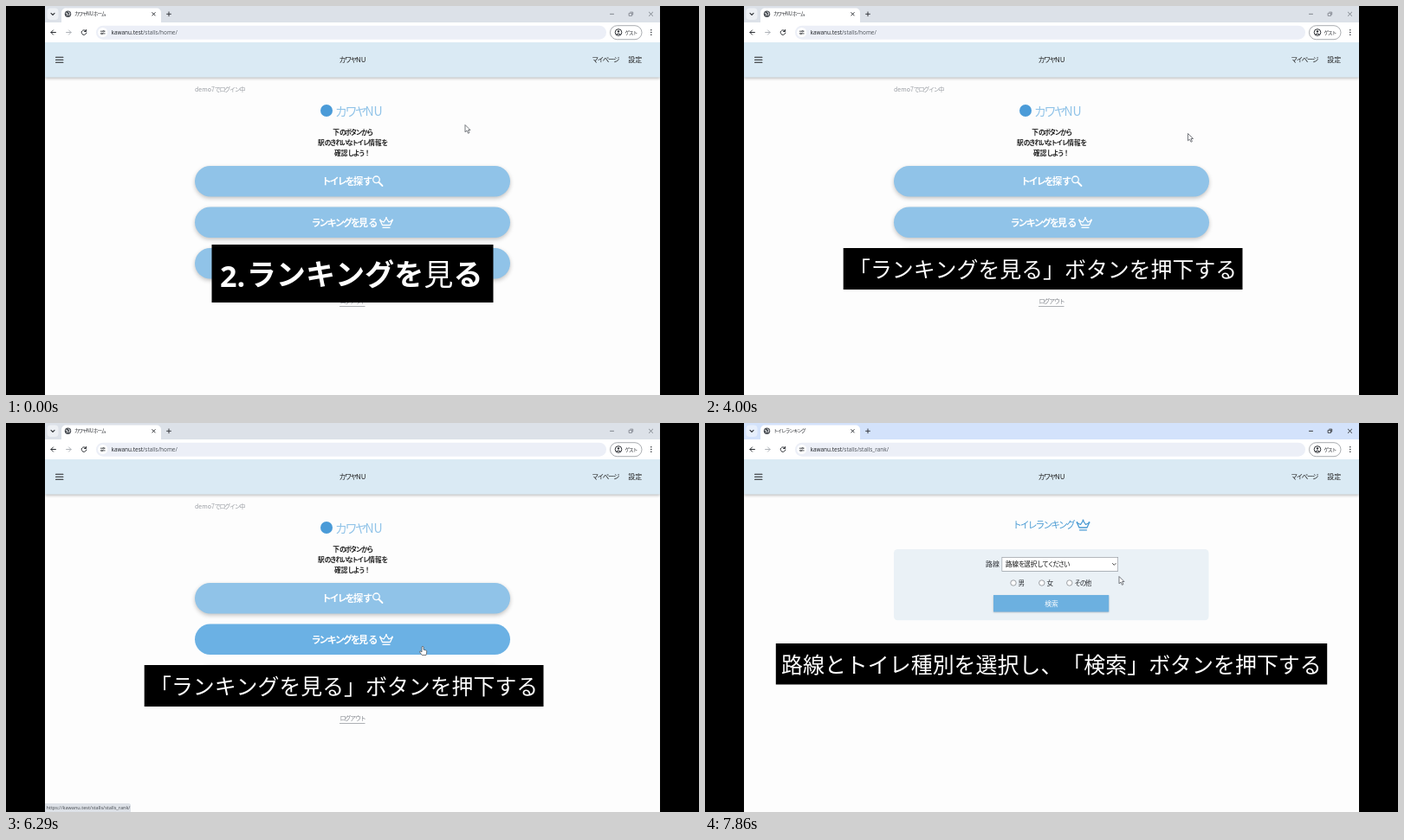
These frames come from a looping animation (800 by 450 pixels, 8000 ms). An HTML page with a canvas:

```html
<!DOCTYPE html>
<html lang="ja">
<head>
<meta charset="utf-8">
<title>Ranking walkthrough</title>
<style>
html, body { margin: 0; width: 100%; height: 100%; overflow: hidden; background: #000; }
canvas { display: block; width: 800px; height: 450px; }
</style>
</head>
<body>
<canvas id="stage"></canvas>
<script>
const LOOP = 8000;
const SANS = '"Noto Sans CJK JP", "Noto Sans CJK", sans-serif';
const LATIN = '"Noto Sans", "Open Sans", sans-serif';
const BLUE = '#90c3e8', HOVER = '#6bb1e4', DARK = '#2b2e33';
const SITE = 'カワヤNU', HOST = 'kawanu.test';

const canvas = document.getElementById('stage');
const ctx = canvas.getContext('2d');
const dpr = window.devicePixelRatio || 1;
canvas.width = 800 * dpr;
canvas.height = 450 * dpr;

// Pointer positions [time, x, y], each held until the next one
const pointer = [
  [0, 530, 137.5], [140, 537, 140], [290, 550, 145], [430, 557, 147], [710, 557.5, 147.5],
  [4710, 510, 255], [5140, 508.5, 260], [5290, 506, 260], [5430, 501, 259.5], [5570, 495, 259],
  [5710, 489, 258.5], [5860, 485, 258], [6000, 482, 258], [6140, 481, 258],
  [7430, 481, 238], [7570, 480, 203], [7720, 479, 182], [7860, 478, 177.5]
];

const captions = [
  { from: 0, to: 3430, box: [237.5, 276, 325, 67], size: 34.1, x: 247, lead: '2.', text: 'ランキングを見る', weight: 700, kanji: 400 },
  { from: 4000, to: 7290, box: [159.7, 280, 460.8, 48], size: 24.9, x: 166, text: '「ランキングを見る」ボタンを押下する', weight: 400, kanji: 300 },
  { from: 7860, to: LOOP, box: [81.8, 255, 636.4, 47.6], size: 24.95, x: 88, text: '路線とトイレ種別を選択し、「検索」ボタンを押下する', weight: 400, kanji: 300 }
];

function rect(x, y, w, h, color, r = 0) {
  ctx.beginPath();
  ctx.roundRect(x, y, w, h, r);
  ctx.fillStyle = color;
  ctx.fill();
}

function shadowRect(x, y, w, h, color, r, blur = 5, drop = 2) {
  ctx.save();
  ctx.shadowColor = 'rgba(0,0,0,.24)';
  ctx.shadowBlur = blur * dpr;
  ctx.shadowOffsetY = drop * dpr;
  rect(x, y, w, h, color, r);
  ctx.restore();
}

function circle(x, y, r, color) {
  ctx.beginPath();
  ctx.arc(x, y, r, 0, Math.PI * 2);
  ctx.fillStyle = color;
  ctx.fill();
}

function ring(x, y, r, color, width = 0.8) {
  ctx.beginPath();
  ctx.arc(x, y, r, 0, Math.PI * 2);
  ctx.strokeStyle = color;
  ctx.lineWidth = width;
  ctx.stroke();
}

function stroke(path, color, width = 1, x = 0, y = 0) {
  ctx.save();
  ctx.translate(x, y);
  ctx.strokeStyle = color;
  ctx.lineWidth = width;
  ctx.lineJoin = ctx.lineCap = 'round';
  ctx.stroke(new Path2D(path));
  ctx.restore();
}

// Kana are set tighter than kanji and latin; y is the middle of the line
function text(s, x, y, size, { color = DARK, weight = 400, align = 0, font = SANS } = {}) {
  ctx.font = `${weight} ${size}px ${font}`;
  const runs = s.match(/[ぁ-ヿ]+|[^ぁ-ヿ]+/g).map(part => {
    const gap = /[ぁ-ヿ]/.test(part) ? -0.18 * size + 'px' : '0px';
    ctx.letterSpacing = gap;
    return { part, gap, width: ctx.measureText(part).width };
  });
  x -= align * runs.reduce((sum, run) => sum + run.width, 0);
  ctx.fillStyle = color;
  for (const { part, gap, width } of runs) {
    ctx.letterSpacing = gap;
    ctx.fillText(part, x, y + size * 0.37);
    x += width;
  }
  ctx.letterSpacing = '0px';
  return x;
}

function cross(x, y, r, color, width = 1) {
  stroke(`M${-r} ${-r}L${r} ${r}M${r} ${-r}L${-r} ${r}`, color, width, x, y);
}

function crown(x, y, color) {
  stroke('M3.5 9.5L1 4L5 6L8 1.5L11 6L15 4L12.5 9.5ZM4 12.3H12', color, 1.3, x, y);
  for (const [dx, dy] of [[1, 3.5], [8, 1], [15, 3.5]]) circle(x + dx, y + dy, 1, color);
}

function globe(x, y) {
  circle(x, y, 3.7, '#4b4f55');
  stroke('M-2.4 -1.2L-.5 -.3L-.8 1.5M.6 -2.4L2.3 -1L1.4 1.4', '#fff', 0.9, x, y);
}

function chrome(s) {
  const ink = s.active ? '#222' : '#777c84';
  rect(45, 0, 710, 19, s.active ? '#d3e2fb' : '#dce1e8');
  rect(45, 19, 710, 23, '#fff');
  rect(47.5, 2.5, 13, 13.5, s.active ? '#e7effc' : '#edf0f4', 4);
  stroke('M-2 -1L0 1L2 -1', DARK, 1.1, 54, 9.3);
  rect(64, 2.5, 115, 17, '#fff', [5, 5, 0, 0]);
  if (s.favicon === 'dot') circle(72, 9.3, 3.2, '#4a9bd8');
  else globe(71.5, 9.3);
  text(s.ranked ? 'トイレランキング' : SITE + 'ホーム', 79, 9.4, 5.6);
  cross(170.5, 9.3, 1.7, DARK);
  stroke('M-2.4 0H2.4M0 -2.4V2.4', DARK, 0.9, 188, 9.3);

  stroke('M-2 0H2', ink, 0.9, 699.5, 9.3);
  stroke('M-2 -1H1V2H-2ZM-.7 -2.2H2.2V.7', ink, 0.8, 721.5, 9.3);
  cross(744.5, 9.3, 2.1, ink, 0.9);

  const arrow = 'M2.7 0H-2.7M-.2 -2.6L-2.8 0L-.2 2.6';
  stroke(arrow, DARK, 1, 54.7, 30.5);
  ctx.save();
  ctx.scale(-1, 1);
  stroke(arrow, '#aeb2b8', 1, -72.3, 30.5);
  ctx.restore();
  if (s.loading) cross(90.3, 30.5, 2.1, DARK);
  else stroke('M2 -1.9A2.8 2.8 0 1 0 2.8 .5M2.6 -3V-1H.6', DARK, 1, 90, 30.5);

  rect(104, 22.7, 589, 16, '#eceff7', 8);
  circle(111.7, 30.5, 5.6, '#fff');
  stroke('M-2.5 -1.3H0M1.8 -1.3H2.5M-2.5 1.4H-1.8M0 1.4H2.5', DARK, 0.8, 111.7, 30.5);
  ring(112.6, 29.2, 0.8, DARK, 0.7);
  ring(110.8, 31.9, 0.8, DARK, 0.7);
  const end = text(HOST, 121.5, 30.4, 6.4, { font: LATIN });
  text(s.ranked ? '/stalls/stalls_rank/' : '/stalls/home/', end, 30.4, 6.4, { font: LATIN, color: '#555a61' });

  ctx.beginPath();
  ctx.roundRect(697.5, 22.7, 36.5, 16, 8);
  ctx.strokeStyle = '#85898f';
  ctx.lineWidth = 0.7;
  ctx.stroke();
  ring(707, 30.5, 3.8, DARK, 1);
  circle(707, 29.4, 1.2, DARK);
  stroke('M-2 2.2Q0 .5 2 2.2', DARK, 1, 707, 30.5);
  text('ゲスト', 714.5, 30.5, 5.6);
  for (const y of [27.7, 30.5, 33.3]) circle(744.8, y, 0.8, DARK);
}

function header() {
  shadowRect(45, 42, 710, 40.5, '#daeaf4', 0, 3, 1);
  stroke('M0 0H8.4M0 3H8.4M0 6H8.4', '#222', 1.1, 57.5, 59.3);
  text(SITE, 400, 62.5, 8, { align: 0.5, color: '#222', weight: 500 });
  text('マイページ', 676.5, 62.5, 7.5, { color: '#222' });
  text('設定', 718.3, 62.5, 7.9, { color: '#222' });
}

function pill(y, label, x, hover) {
  if (hover) rect(218, y, 364, 35.5, HOVER, 17.75);
  else shadowRect(218, y, 364, 35.5, BLUE, 17.75);
  text(label, x, y + 18, 11.1, { color: '#fff', weight: 700 });
}

function home(hover) {
  text('demo7でログイン中', 218, 96.5, 7, { color: '#999da3' });
  circle(370, 121, 7, '#4a9bd8');
  text(SITE, 380, 121.5, 14, { color: BLUE, weight: 500 });
  ['下のボタンから', '駅のきれいなトイレ情報を', '確認しよう！'].forEach((line, i) =>
    text(line, 400, 145.8 + i * 12, 7.7, { align: 0.5, color: '#222', weight: 700 }));

  pill(185, 'トイレを探す', 364.5, false);
  ring(427.5, 200.8, 3.8, '#fff', 1.3);
  stroke('M430.5 204L434.5 208', '#fff', 1.8);

  pill(232.5, 'ランキングを見る', 352.5, hover);
  crown(431, 244, '#fff');

  pill(280, '最新のレビュー見る', 347.5, false);
  circle(442, 295.7, 2.8, '#fff');
  rect(437, 299.3, 10, 4, '#fff', [3, 3, 0, 0]);
  stroke('M446.5 292.7H452.5V297H449L447.5 298.5V297H446.5Z', '#fff', 0.9);

  text('ログアウト', 400, 341.7, 7.1, { align: 0.5, color: '#83878d' });
  rect(385, 347, 29.5, 0.8, '#9a9da2');
}

function ranking() {
  text('トイレランキング', 355, 118.5, 10.8, { color: '#4a9bd3', weight: 500 });
  crown(428.5, 111.5, '#4a9bd3');
  rect(218, 146, 363.5, 82.3, '#eaf1f6', 4.5);
  text('路線', 324, 163.5, 7.9);
  rect(342.5, 155, 134.5, 16.8, '#999fa5');
  rect(343.2, 155.7, 133.1, 15.4, '#fff');
  text('路線を選択してください', 347, 163.6, 7.5, { color: '#111' });
  stroke('M-1.8 -1L0 .9L1.8 -1', '#333', 0.9, 472.3, 163.5);
  for (const [x, label] of [[356, '男'], [388.8, '女'], [420.8, 'その他']]) {
    circle(x, 185, 3.2, '#fff');
    ring(x, 185, 3.2, '#767a80', 0.7);
    text(label, x + 5.6, 185.2, 7.6);
  }
  shadowRect(333, 199, 133.2, 19.4, '#6cb0e0', 0, 2, 1);
  text('検索', 400, 208.8, 7.8, { align: 0.5, color: '#fff' });
}

function status(active) {
  rect(45, 440, 99, 10, active ? '#d3e2fb' : '#dde1e7', [0, 2.5, 0, 0]);
  text(`https://${HOST}/stalls/stalls_rank/`, 46.5, 445.3, 5.5, { font: LATIN, color: '#4c5056' });
}

function cursor(x, y, hand) {
  const shape = new Path2D(hand
    ? 'M-1 1Q0 -.6 1 1V4.2L4 5Q5 5.4 4.7 7L4 10.5H-.8L-3.4 7Q-3.6 5.6 -2.2 6L-1 7Z'
    : 'M0 0V8.3L2 6.6L3.5 9.8L4.9 9.1L3.5 6H6Z');
  ctx.save();
  ctx.translate(x, y);
  ctx.fillStyle = '#fff';
  ctx.strokeStyle = '#55595f';
  ctx.lineWidth = 0.8;
  ctx.lineJoin = 'round';
  ctx.fill(shape);
  ctx.stroke(shape);
  ctx.restore();
}

function caption(c) {
  rect(...c.box, '#000');
  const y = c.box[1] + c.box[3] / 2 + 1;
  let x = c.x;
  if (c.lead) x = text(c.lead, x, y + 2, c.size, { color: '#fff', weight: 700, font: LATIN }) + 1.5;
  for (const ch of c.text) {
    text(ch, x, y, c.size, { color: '#fff', weight: /[一-龠]/.test(ch) ? c.kanji : c.weight });
    x += c.size;
  }
}

function draw(t) {
  const within = (a, b) => t >= a && t < b;
  const state = {
    active: t >= 6860,
    loading: within(7000, 7430),
    ranked: t >= 7140,
    favicon: within(7140, 7430) ? 'dot' : 'globe'
  };
  const [, x, y] = pointer.findLast(p => p[0] <= t);

  ctx.setTransform(dpr, 0, 0, dpr, 0, 0);
  rect(0, 0, 800, 450, '#000');
  ctx.save();
  ctx.beginPath();
  ctx.rect(45, 0, 710, 450);
  ctx.clip();
  rect(45, 42, 710, 408, '#fdfdfd');
  header();
  chrome(state);
  if (t < 7290) home(within(5140, 7140));
  else ranking();
  if (within(5430, 7290)) status(state.active);
  cursor(x, y, within(5140, 7140));
  ctx.restore();
  captions.filter(c => within(c.from, c.to)).forEach(caption);
}

const start = performance.now();
function tick() {
  draw((performance.now() - start) % LOOP);
  requestAnimationFrame(tick);
}
tick();
</script>
</body>
</html>
```
